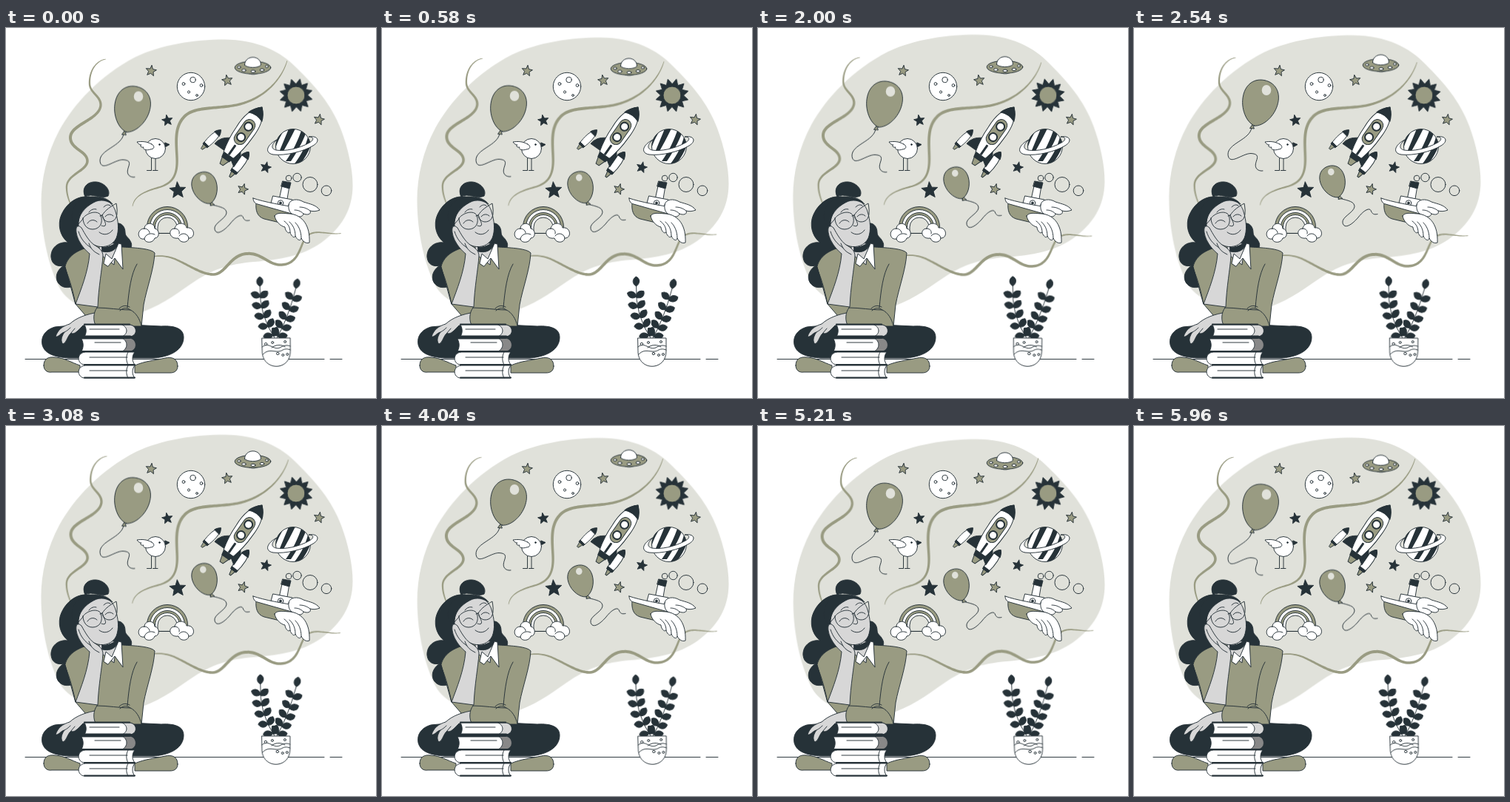
Recreate the animation shown at these times as an HTML page. Size 500 px wide and 500 px high, loop 6 s.

```html
<!DOCTYPE html>
<html lang="en">
<head>
<meta charset="utf-8">
<title>Daydream</title>
<style>
html, body { margin: 0; width: 100%; height: 100%; overflow: hidden; background: #fff; }
svg { display: block; width: 100%; height: 100%; }
svg * { stroke-linecap: round; stroke-linejoin: round; }
.ink { stroke: #263238; stroke-width: .95; }
.dark { fill: #263238; }
.olive { fill: #999b82; }
.pale { fill: #e0e1da; }
.skin { fill: #d7d7d7; }
.white { fill: #fff; }
.none { fill: none; }
.bare { stroke: none; }

.bob, .swing { animation: bob 3s cubic-bezier(.37, 0, .63, 1) infinite alternate; }
.swing { animation-name: swing; animation-delay: -1.05s; }
.cloud { --turn: .35deg; transform-origin: 260px 200px; animation-name: drift; animation-delay: -1.05s; }
.lines { --turn: .73deg; transform-origin: 260px 200px; }
.plant { --turn: .9deg; transform-origin: 365px 400px; }
.sun { --turn: 3deg; transform-origin: 392px 91px; }
.ufo { animation-delay: -5.1s; }
@keyframes bob { from { transform: translateY(4.5px); } to { transform: translateY(-4.5px); } }
@keyframes swing {
  from { transform: rotate(calc(-1 * var(--turn))); }
  to { transform: rotate(var(--turn)); }
}
@keyframes drift {
  from { transform: translateY(4.7px) rotate(calc(-1 * var(--turn))); }
  to { transform: translateY(-4.7px) rotate(var(--turn)); }
}
</style>
</head>
<body>
<svg viewBox="0 0 500 500">
  <defs>
    <clipPath id="globe"><circle cx="388" cy="160" r="23.5"/></clipPath>
    <path id="balloon" vector-effect="non-scaling-stroke" d="M0 32C-12 30 -24 13 -24 -5C-24 -21 -14 -31 0 -31C14 -31 24 -21 24 -5C24 13 12 30 0 32Z"/>
  </defs>

  <g class="bob cloud">
    <path class="pale" transform="translate(0 -2)" d="M47.500 235C47.500 204 55 170 72 138C92 102 127 64 175 39C211 22 255 15.500 295 15.500C340 15.500 372 32 393 54C418 79 440 103 453 138C462 162 468.500 190 468.500 213C468.500 246 453 271 425 291C400 308 372 313 335 316C300 319 280 326 255 342C235 355 215 372 185 383C150 394 94 384 74 354C58 325 47.500 280 47.500 235Z"/>
  </g>
  <g class="swing lines"><g id="lines" class="olive" transform="rotate(.33 260 200)"></g></g>

  <g id="stars" class="ink"></g>

  <!-- moon -->
  <g class="ink white">
    <circle cx="250" cy="79" r="18.700"/>
    <circle cx="252.500" cy="70" r="3.700"/><circle cx="264" cy="77.500" r="1.900"/>
    <circle cx="240" cy="75.500" r="1.900"/><circle cx="247" cy="86.500" r="1.600"/><circle cx="258" cy="91" r="1.400"/>
  </g>

  <!-- saucer -->
  <g class="bob ufo ink"><g transform="translate(0 -2.700)">
    <path class="white" d="M326 60C327 63 339 64 342 60"/>
    <ellipse class="olive" cx="333.500" cy="53.500" rx="24.300" ry="8.500"/>
    <path class="white" d="M322.500 50C322.500 36 344.500 36 344.500 50C341 54.500 326 54.500 322.500 50Z"/>
    <ellipse class="white" cx="315" cy="53" rx="2.300" ry="1.500"/>
    <ellipse class="white" cx="321.500" cy="57.200" rx="2.800" ry="1.700"/>
    <ellipse class="white" cx="334" cy="58.600" rx="3" ry="1.700"/>
    <ellipse class="white" cx="346" cy="56.700" rx="2.800" ry="1.700"/>
    <ellipse class="white" cx="352.500" cy="52" rx="2" ry="1.500"/>
  </g></g>

  <g class="swing sun ink">
    <path id="rays" class="dark"/>
    <circle class="olive" cx="392" cy="91" r="12"/>
  </g>

  <!-- ringed planet -->
  <circle class="white" cx="388" cy="160" r="23.500"/>
  <g class="dark" clip-path="url(#globe)">
    <path d="M368 144L376 138C370 147 366 156 364 163L362 160ZM383 134L392 134C386 146 380 158 374 168L368 170C373 158 378 146 383 134ZM400 136L406 140C401 154 393 168 385 180L378 180C388 166 395 151 400 136ZM409 143L414 152C411 164 404 176 396 186L388 186C399 172 406 158 409 143ZM414 165L412 175L402 184Z"/>
  </g>
  <circle class="ink none" cx="388" cy="160" r="23.500"/>
  <path class="ink white" d="M366 151C352 158 349 169 361 171C377 173 402 167 415 159C425 153 422 145 409 147C416 147 417 151 410 155C396 163 377 167 365 165C357 163 359 157 366 151Z"/>

  <!-- rocket -->
  <g class="ink" transform="translate(346 107) rotate(35)">
    <g id="boosters"></g>
    <path class="dark" d="M-11 58C-19 63 -23 68 -24 77L-8 77ZM8 62L15 72V88L3 80Z"/>
    <path class="olive" d="M-6 84H6L2 95H-3Z"/>
    <path class="dark" d="M-8 77H8L6 86H-6Z"/>
    <path class="white" d="M0 0C11 11 14 24 13 42C13 56 11 68 8 79H-8C-11 68 -13 56 -13 42C-14 24 -11 11 0 0Z"/>
    <path class="dark" d="M0 0C6 5 9 10 11 16C4 13 -4 13 -11 16C-9 10 -6 5 0 0Z"/>
    <rect class="olive" x="-8" y="22" width="16" height="38" rx="8"/>
    <g class="white" style="stroke-width:2"><circle cy="32" r="5.500"/><circle cy="49.500" r="5.500"/></g>
    <path class="dark" d="M-1 63H1V78H-1Z"/>
  </g>

  <!-- bird -->
  <g class="ink">
    <path class="none" d="M196.500 175V192M202 175V192M190.500 192.500H196.500M198.500 192.500H205"/>
    <path class="dark" d="M215 155L221 157.500L215 161Z"/>
    <circle class="white" cx="202" cy="163" r="13.500"/>
    <path class="white" d="M197 157C190 153 183 153 177 154C179 157 181 158 183 158C180 159 183 162 186 161C184 164 190 166 195 164C200 164 202 160 197 157Z"/>
    <circle class="dark" cx="207.500" cy="157.500" r=".9"/>
  </g>

  <!-- balloons -->
  <g class="bob ink"><g transform="translate(0 -4.500)">
    <path class="none" d="M159 143C157 160 126 164 127 180C129 195 146 178 158 178C176 179 159 191 166 199C168 201 171 202 174 201.500"/>
    <path class="olive" d="M160 139L156.500 144L162 144.500Z"/>
    <use href="#balloon" class="olive" transform="translate(170 109.500) rotate(13)"/>
    <ellipse class="pale bare" cx="179" cy="92.500" rx="6.300" ry="7"/>
    <path class="none" d="M279.500 239C290 242 298 243 298 250C297 258 280 264 282 272C285 283 299 270 305 262C311 255 318 251 320 255C322 260 324 261 329 260"/>
    <path class="olive" d="M277 235L276 240L281.500 239Z"/>
    <use href="#balloon" class="olive" transform="translate(269 216) rotate(-18) scale(.7)"/>
    <ellipse class="pale bare" cx="266.300" cy="203" rx="4.300" ry="4.700"/>
  </g></g>

  <!-- rainbow -->
  <g class="ink">
    <path class="olive" d="M190.500 277V269A27.500 27.500 0 0 1 245.500 269V277Z"/>
    <path class="white" d="M194.500 277V269A23.500 23.500 0 0 1 241.500 269V277Z"/>
    <path class="olive" d="M198.500 277V269A19.500 19.500 0 0 1 237.500 269V277Z"/>
    <path class="white" d="M201.500 277V269A16.500 16.500 0 0 1 234.500 269V277Z"/>
    <path class="pale" d="M205 277V269A13 13 0 0 1 231 269V277Z"/>
    <path class="white" d="M187 271C187 262 201 262 201 271C208 272 208 284 201 284C199 291 188 291 187 285C177 287 176 271 187 271Z"/>
    <path class="white" d="M228 271C229 262 243 262 244 270C255 268 257 284 247 284C246 291 235 291 233 284C220 286 218 271 228 271Z"/>
    <path class="none" d="M187 271C191 271 194 274 194 277M201 279C195 276 188 279 187 285M228 271C233 271 235 275 234 278M247 284C246 277 237 276 234 281"/>
  </g>

  <!-- winged ship -->
  <g class="ink">
    <g class="pale"><circle cx="382" cy="203" r="3.800"/><circle cx="393.500" cy="202" r="5.700"/><circle cx="411" cy="211.500" r="10"/><circle cx="433" cy="219.800" r="6.800"/></g>
    <path class="white" d="M374 211L383 213L380 231L370 229Z"/>
    <path class="dark" d="M374 207L385 209L383 217L372 214Z"/>
    <path class="white" d="M361 227L387 232L385 246L358 238Z"/>
    <circle class="white" cx="371" cy="236.500" r="3.700"/><circle class="dark" cx="371" cy="236.500" r="1.500"/>
    <path class="olive" d="M338 236L388 250C387 259 380 264 370 263L349 258C339 255 337 246 338 236Z"/>
    <path class="white" d="M334 230C348 235 376 240 396 243C396 249 391 252 386 251L340 238C336 237 334 234 334 230Z"/>
    <path class="white" d="M382 239C383 231 394 230 402 235C411 238 419 239 424 246C419 248 415 248 411 247C413 252 407 253 402 251C401 256 394 256 390 253C384 251 381 246 382 239Z"/>
    <path class="none" d="M411 247C406 243 401 242 397 242M402 251C398 247 394 246 390 246"/>
    <path class="white" d="M363 254C366 248 377 251 384 251C401 253 411 267 410 290C405 292 401 288 399 284C398 289 393 286 391 281C390 285 385 281 384 276C381 279 377 273 377 269C371 268 364 261 363 254Z"/>
    <path class="none" d="M399 284C399 274 395 267 391 263M391 281C391 271 387 266 383 262M384 276C384 268 380 264 376 261"/>
  </g>

  <path class="ink none" d="M26 447.500H430M438 447.500H454"/>

  <!-- dreamer -->
  <g class="ink">
    <path class="dark" d="M112 228C94 226 78 240 73 258C70 272 76 284 84 290C70 288 60 298 61 310C62 320 70 323 78 321C64 330 66 346 78 350C90 353 100 345 108 330L140 304H158C166 302 173 296 168 288C165 282 161 282 161 276C161 268 155 263 150 264L147 248C142 236 128 228 112 228Z"/>
    <path class="dark" d="M107 228C101 216 110 207 122 208C133 209 142 219 138 227C128 232 117 222 107 228Z"/>
    <path class="dark" d="M66 404C52 408 47 418 49 428C52 441 68 445 85 446H200C224 444 240 434 240 418C240 406 228 402 210 403L125 399Z"/>
    <path class="olive" d="M51 456C51 447 57 444 66 445C80 446 88 452 100 456V465H62C55 466 51 462 51 456Z"/>
    <path class="olive" d="M232 457C232 447 225 444 215 446C202 449 188 450 174 456V466H222C229 466 232 462 232 457Z"/>
    <path class="olive" d="M80 322C84 306 100 298 121 294L158 296C175 297 196 298 201 304C200 326 190 352 186 374L183 403H120L94 373Z"/>
    <path class="skin" d="M126 288V305L146 320L150 292Z"/>
    <path class="dark" d="M130 296C138 297 146 293 151 288L150 295C146 302 138 304 130 302Z"/>
    <path class="white" d="M132 318L135 305L143 312L152 291L156 292L158 326L147 311L138 322Z"/>
    <path class="skin" d="M98 268C97 250 108 236 122 232C136 229 145 238 148 248C152 261 153 274 149 284C144 294 134 297 124 295C111 291 100 282 98 268Z"/>
    <path class="dark" d="M97 268C97 252 107 242 118 236C128 230 138 234 144 238C134 224 102 224 92 242C86 256 90 266 97 268Z"/>
    <path class="skin" d="M95 270C93 282 103 297 113 305C111 330 101 354 94 373L124 377C125 350 130 325 131 308C131 300 124 296 119 293C112 288 107 279 102 270C99 267 96 267 95 270Z"/>
    <path class="none" d="M98 275C101 285 107 292 115 297M112 291C115 300 120 303 126 306"/>
    <g class="none">
      <path d="M104 257C110 249 124 246 128 253C132 264 126 272 117 272C108 272 104 264 104 257Z"/>
      <path d="M130 253C134 246 142 241 149 237C151 248 151 258 144 261C137 264 131 260 130 253Z"/>
      <path d="M127 254L130 253M104 258L97 266M110 264C113 259 119 258 123 262M134 255C137 251 142 251 145 254M112 249C115 245 119 244 122 245M132 242C135 239 138 238 141 240M131 255C132 260 136 264 134 267C133 268 131 268 129 267M126 276C132 281 140 279 144 273"/>
    </g>
    <path class="skin" d="M125 384C108 387 96 391 86 400C76 403 70 408 67 417C71 418 74 412 79 411C74 418 74 424 77 427C82 425 83 416 88 412C92 416 100 406 104 402L127 402Z"/>
    <path class="none" d="M79 411C83 409 85 407 87 405M88 412C90 410 91 408 93 406"/>
    <path class="olive" d="M123 378C138 378 153 381 168 381C175 384 181 393 183 403H122C117 396 118 384 123 378Z"/>
    <path class="none" d="M177 319C169 332 166 355 164 378M154 382C159 377 164 378 168 381M153 379C158 374 163 375 167 377M94 373C91 358 87 342 80 325"/>
  </g>

  <!-- books -->
  <g class="ink">
    <path class="white" d="M106 401H166C178 401 179 417 166 417H106C109 412 109 406 106 401Z"/>
    <path class="skin" d="M157 401H166C178 401 179 417 166 417H157C165 413 165 405 157 401Z"/>
    <path class="white" d="M102 420H166C178 420 179 437 166 437H102C105 431 105 426 102 420Z"/>
    <path style="fill:#888" d="M157 419H166C178 419 179 437 166 437H157C165 433 165 423 157 419Z"/>
    <path class="white" d="M106 438H174C170 443 170 450 174 455H106C96 454 95 440 106 438Z"/>
    <path class="white" d="M106 456H174C170 461 170 468 174 473H106C96 472 95 458 106 456Z"/>
    <path class="none" style="stroke-width:2" d="M106 400.500H167M104 416.500H168M101 419H167M101 437H174M106 455H174M106 472.500H174"/>
    <path class="none" d="M113 407H153M120 425H155M113 445H164M113 463H164M165 438C162 443 162 450 165 455M165 456C162 461 162 468 165 473"/>
  </g>

  <g class="swing plant ink">
    <g id="leaves"></g>
    <path class="white" d="M346 419H384V437C384 464 346 464 346 437Z"/>
    <path class="none" d="M346 431C355 423 361 436 370 432C375 429 379 428 384 430M347 441C356 431 365 441 374 435C378 433 381 434 384 435M359 432C363 428 372 427 377 431"/>
    <g class="white"><circle cx="351" cy="427" r="1.700"/><circle cx="360" cy="425" r="1.500"/><circle cx="367" cy="440" r="1.700"/><circle cx="374" cy="442" r="1.500"/><circle cx="380" cy="441" r="1.500"/><circle cx="377" cy="424" r="1.500"/></g>
  </g>
</svg>

<script>
const $ = id => document.getElementById(id);
function add(parent, d, cls, transform) {
  const p = document.createElementNS('http://www.w3.org/2000/svg', 'path');
  p.setAttribute('d', d);
  if (cls) p.setAttribute('class', cls);
  if (transform) p.setAttribute('transform', transform);
  return parent.appendChild(p);
}
const polygon = pts => 'M' + pts.map(p => p.map(v => v.toFixed(2)).join(' ')).join('L') + 'Z';

function burst(x, y, n, outer, inner, turn) {
  return polygon(Array.from({ length: 2 * n }, (_, i) => {
    const a = Math.PI * i / n + turn, r = i % 2 ? inner : outer;
    return [x + r * Math.sin(a), y - r * Math.cos(a)];
  }));
}

// Outline of a curve whose stroke swells in the middle.
function taper(d, width) {
  const path = add($('lines'), d), len = path.getTotalLength(), left = [], right = [];
  for (let i = 0; i <= 160; i++) {
    const s = len * i / 160;
    const a = path.getPointAtLength(Math.max(0, s - .5)), b = path.getPointAtLength(Math.min(len, s + .5));
    const size = Math.hypot(b.x - a.x, b.y - a.y), half = .4 + width / 2 * Math.sin(Math.PI * i / 160);
    const nx = -(b.y - a.y) / size * half, ny = (b.x - a.x) / size * half;
    const x = (a.x + b.x) / 2, y = (a.y + b.y) / 2;
    left.push([x + nx, y + ny]);
    right.unshift([x - nx, y - ny]);
  }
  path.setAttribute('d', polygon(left.concat(right)));
}
taper('M135 42C122 44 112 58 113 76C114 88 128 92 128 104C127 124 87 130 87 148C87 164 110 166 110 180C109 194 80 198 82 217C82 226 87 242 97 254', 3.2);
taper('M380 44C372 72 345 99 306 105C280 109 258 107 244 117C227 131 230 152 231 175C232 198 226 209 208 215C190 220 173 226 171 241', 3.2);
taper('M180 318C195 306 212 306 228 312C250 322 265 333 280 333C297 333 302 307 325 305C345 303 355 321 372 320C398 319 397 290 407 281C418 271 435 280 453 277.500', 3.2);

const stars = [
  [196, 58, 7.5, 'olive', .15], [299, 71, 7.5, 'olive', -.15], [423, 124, 7.5, 'olive', .2], [320, 218, 7.5, 'olive', .3],
  [218, 125, 7.5, 'dark', -.15], [351, 188.500, 7.5, 'dark', .25], [232, 219.500, 11.500, 'dark', -.05]
];
for (const [x, y, r, cls, turn] of stars) add($('stars'), burst(x, y, 5, r, r * .45, turn), cls);
$('rays').setAttribute('d', burst(392, 91, 12, 22.500, 15.500, Math.PI / 12));

for (const [x, y, turn, k] of [[-28, 57.5, 10, .93], [20, 60, 2, 1.08]]) {
  const at = `translate(${x} ${y}) rotate(${turn}) scale(${k})`;
  add($('boosters'), 'M-3 31H3L1 39H-1Z', 'olive', at);
  add($('boosters'), 'M0 0C6 5 6 20 4 32H-4C-6 20 -6 5 0 0Z', 'white', at);
  add($('boosters'), 'M0 0C3 2 4 5 5 8H-5C-4 5 -3 2 0 0ZM-4.500 29H4.500L4 32H-4Z', 'dark', at);
}

const leaf = 'M0 0C3 -6 9 -6 13 -1C11 5 4 5.500 0 0Z';
function branch(x0, y0, cx, cy, x1, y1) {
  add($('leaves'), `M${x0} ${y0}Q${cx} ${cy} ${x1} ${y1}`, 'none');
  const at = (a, c, b, t) => (1 - t) * (1 - t) * a + 2 * t * (1 - t) * c + t * t * b;
  const slope = (a, c, b, t) => (1 - t) * (c - a) + t * (b - c);
  const put = (t, bend) => {
    const angle = Math.atan2(slope(y0, cy, y1, t), slope(x0, cx, x1, t)) * 180 / Math.PI + bend;
    add($('leaves'), leaf, 'dark', `translate(${at(x0, cx, x1, t)} ${at(y0, cy, y1, t)}) rotate(${angle})`);
  };
  for (let i = 0; i < 5; i++) {
    put(.06 + i * .19, -62);
    put(.04 + i * .19, 58);
  }
  put(1, 0);
}
branch(363, 419, 342, 388, 343.500, 349);
branch(366, 419, 381, 393, 392, 352);
</script>
</body>
</html>
```
